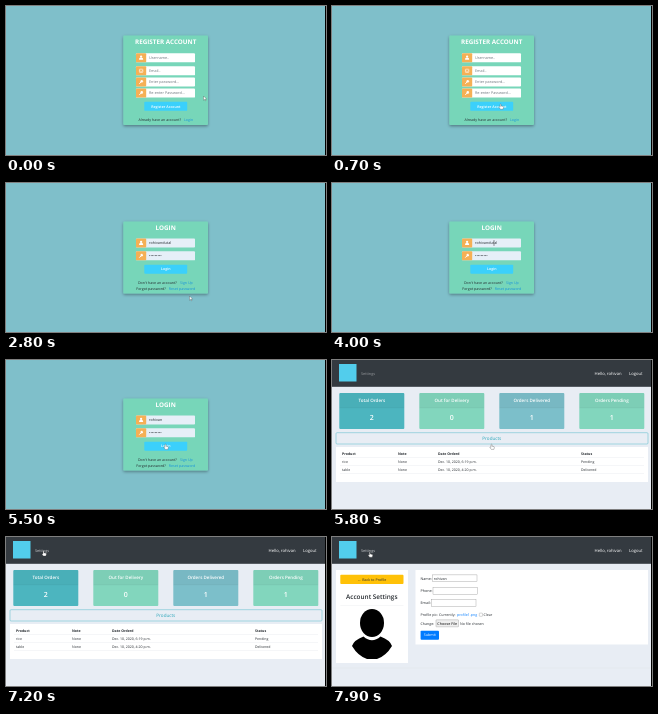
An HTML page for the animation above (8000 ms loop, 320x149 px).

```html
<!DOCTYPE html>
<html lang="en">
<head>
<meta charset="utf-8">
<title>Account and orders</title>
<style>
  html, body { margin: 0; width: 100%; height: 100%; overflow: hidden; background: #7fbfca; }
  svg { display: block; width: 100vw; height: 100vh; }
  text {
    font-family: "Open Sans", "Noto Sans", sans-serif;
    text-rendering: geometricPrecision;
    white-space: pre;
  }
</style>
</head>
<body>
<svg id="stage" viewBox="0 0 320 149" preserveAspectRatio="none">
  <defs>
    <filter id="shadow" x="-20%" y="-20%" width="140%" height="150%">
      <feDropShadow dx="0" dy="1.2" stdDeviation="1.7" flood-color="#000" flood-opacity=".38"/>
    </filter>
  </defs>
</svg>
<script>
const LOOP = 8000, STEP = 100;
const USER = 'rohivan', SUFFIX = 'dutal';
const WHITE = '#fff', INK = '#24292e', LINK = '#1590dc', TEAL = '#2ba6ba';
const stage = document.getElementById('stage');

function el(parent, tag, attrs, content) {
  const node = document.createElementNS('http://www.w3.org/2000/svg', tag);
  for (const key in attrs) node.setAttribute(key, attrs[key]);
  if (content !== undefined) node.textContent = content;
  parent.appendChild(node);
  return node;
}
const group = (parent = stage) => el(parent, 'g', {});
const rect = (g, x, y, width, height, fill, more) =>
  el(g, 'rect', { x, y, width, height, fill, ...more });
const path = (g, d, fill, more) => el(g, 'path', { d, fill, ...more });

// y is the middle of the line of text
function label(g, content, x, y, size, fill, more) {
  return el(g, 'text', { x, y: y + size * 0.34, 'font-size': size, fill, ...more }, content);
}
const centred = (g, content, x, y, size, fill, weight = 400) =>
  label(g, content, x, y, size, fill, { 'text-anchor': 'middle', 'font-weight': weight });

const icons = {
  user(g, x, y) {
    el(g, 'circle', { cx: x, cy: y - 1.1, r: 1.15, fill: WHITE });
    path(g, `M${x - 2} ${y + 2}v-.7q0-1.3 1.4-1.3h1.2q1.4 0 1.4 1.3v.7z`, WHITE);
  },
  mail(g, x, y) {
    rect(g, x - 1.7, y - 1.6, 3.4, 3.2, 'none', { stroke: WHITE, 'stroke-width': 0.6, rx: 0.4 });
    path(g, `M${x - 1.6} ${y - 0.3}l1.6 1.1l1.6 -1.1`, 'none', { stroke: WHITE, 'stroke-width': 0.5 });
  },
  key(g, x, y) {
    el(g, 'circle', { cx: x + 0.7, cy: y - 0.7, r: 1.3, fill: WHITE });
    path(g, `M${x + 0.2} ${y - 0.2}l-2 2`, 'none', { stroke: WHITE, 'stroke-width': 1 });
    el(g, 'circle', { cx: x + 1.1, cy: y - 1.1, r: 0.35, fill: '#f5b055' });
  }
};

function field(g, y, icon, content, fill, ink) {
  rect(g, 130, y - 4.5, 59, 9, fill, { rx: 0.9 });
  rect(g, 130, y - 4.5, 10.2, 9, '#f5b055', { rx: 0.9 });
  icons[icon](g, 135.1, y);
  return label(g, content, 143, y, 3.75, ink);
}

function formCard(top, height, title) {
  const g = group();
  rect(g, 0, 0, 320, 149, '#7fbfca');
  rect(g, 117.3, top, 84.7, height, '#77d6b9', { rx: 1.2, filter: 'url(#shadow)' });
  centred(g, title, 159.7, top + 6.4, 6.3, WHITE, 700);
  return g;
}
function formButton(g, y, content) {
  rect(g, 138.3, y - 4.5, 42.9, 9, '#3bd0fb', { rx: 0.9 });
  centred(g, content, 159.8, y, 3.6, WHITE, 600);
}

// Register
const register = formCard(29.6, 89.4, 'REGISTER ACCOUNT');
[[51.8, 'user', 'Username..'], [64.8, 'mail', 'Email..'],
 [76, 'key', 'Enter password...'], [87.1, 'key', 'Re-enter Password...']]
  .forEach(([y, icon, hint]) => field(register, y, icon, hint, WHITE, '#6c757d'));
formButton(register, 100.3, 'Register Account');
label(register, 'Already have an account?', 132.5, 113.7, 3.6, INK);
const loginLink = label(register, 'Login', 178, 113.7, 3.6, LINK);

// Login
const login = formCard(38.5, 72, 'LOGIN');
const userText = field(login, 60, 'user', '', '#e6eff8', INK);
field(login, 72.8, 'key', '•••••••••', '#e6eff8', INK);
formButton(login, 86.2, 'Login');
label(login, "Don't have an account?", 132, 99.7, 3.6, INK);
label(login, 'Sign Up', 174, 99.7, 3.6, LINK);
label(login, 'Forgot password?', 130.3, 105.3, 3.6, INK);
label(login, 'Reset password', 162.8, 105.3, 3.6, LINK);

// Shared page frame
const site = group();
rect(site, 0, 0, 320, 149, '#e8edf4');
rect(site, 0, 0, 320, 26.8, '#343a40');
rect(site, 7, 4, 17.5, 17.5, '#52cdec');
const settingsLink = label(site, 'Settings', 29, 13.7, 3.8, '#999c9f');
const navText = { 'font-weight': 500 };
label(site, 'Hello, ' + USER, 262.6, 13.7, 4.2, WHITE, navText);
label(site, 'Logout', 297, 13.7, 4.2, WHITE, navText);

// Dashboard
const dash = group();
[['Total Orders', 2, '#4cb5bf'], ['Out for Delivery', 0, '#82d6bd'],
 ['Orders Delivered', 1, '#7cbfca'], ['Orders Pending', 1, '#82d6bd']]
  .forEach(([name, count, fill], i) => {
    const x = 7.3 + i * 80;
    rect(dash, x, 33, 65, 36, fill, { rx: 1 });
    rect(dash, x, 33, 65, 15, '#000', { rx: 1, opacity: 0.035 });
    rect(dash, x, 47.8, 65, 0.3, '#000', { opacity: 0.12 });
    centred(dash, name, x + 32.5, 40, 4.5, WHITE, 600);
    centred(dash, count, x + 32.5, 57.3, 7, WHITE, 600);
  });
const bar = rect(dash, 4, 72.7, 312, 11.3, 'transparent',
  { rx: 1, stroke: '#55b9c8', 'stroke-width': 0.5 });
const barText = centred(dash, 'Products', 159.8, 78.5, 4.6, TEAL);
rect(dash, 4, 87, 312, 35, WHITE);
const columns = [10, 66, 106, 249];
[['Product', 'Note', 'Date Orderd', 'Status'],
 ['rice', 'None', 'Dec. 10, 2020, 6:19 p.m.', 'Pending'],
 ['table', 'None', 'Dec. 10, 2020, 4:20 p.m.', 'Delivered']]
  .forEach((row, r) => {
    const y = 93.5 + r * 8;
    row.forEach((cell, c) =>
      label(dash, cell, columns[c], y, 3.5, INK, { 'font-weight': r ? 400 : 700 }));
    rect(dash, 8, y + 4, 304, 0.3, '#dee2e6');
  });

// Settings
const settings = group();
const side = rect(settings, 4, 33, 72, 93, WHITE);
rect(settings, 8.3, 37.8, 63.2, 9.2, '#ffc107', { rx: 0.9 });
centred(settings, '← Back to Profile', 40, 42.4, 3.6, INK);
centred(settings, 'Account Settings', 39.8, 59.7, 6.4, INK, 600);
rect(settings, 8.3, 68, 63.2, 0.3, '#e2e4e6');
const portrait = group(settings);
el(portrait, 'ellipse', { cx: 40, cy: 86, rx: 12, ry: 14, fill: '#000' });
path(portrait, 'M20 109Q22 103 31.5 99.5Q40 107 48.5 99.5Q58 103 60 109Q54 119 45 122H35Q26 119 20 109Z', '#000');
rect(settings, 0, 130.8, 320, 0.4, '#dadfe6');

rect(settings, 83.5, 33, 232.5, 74.5, WHITE);
const box = { stroke: '#8a8a8a', 'stroke-width': 0.35 };
[['Name:', 41.3, 100.5, USER], ['Phone:', 53.8, 101, ''], ['Email:', 66.1, 99.5, '']]
  .forEach(([name, y, x, value]) => {
    label(settings, name, 88.5, y, 3.7, INK);
    rect(settings, x, y - 3.4, 44.5, 6.8, WHITE, box);
    label(settings, value, x + 1.3, y, 3.7, INK);
  });
label(settings, 'Profile pic: Currently:', 88.5, 77.8, 3.6, INK);
label(settings, 'profile1.png', 125, 77.8, 3.6, '#007bff');
rect(settings, 147.3, 76.1, 3.2, 3.2, WHITE, { rx: 0.5, ...box });
label(settings, 'Clear', 151.5, 77.8, 3.6, INK);
label(settings, 'Change:', 88.5, 86.3, 3.6, INK);
rect(settings, 104, 82.8, 22.5, 7, '#efefef', { rx: 0.5, ...box });
centred(settings, 'Choose File', 115.2, 86.3, 3.7, '#000');
label(settings, 'No file chosen', 128, 86.3, 3.6, INK);
rect(settings, 88.6, 93.7, 18.4, 9, '#007bff', { rx: 0.9 });
centred(settings, 'Submit', 97.8, 98.2, 3.7, WHITE);

// Dark strip along the right edge
rect(stage, 319, 0, 1, 149, '#000');

// Pointers, each with its hot spot at 0,0
const outline = { stroke: '#333', 'stroke-width': 0.3, 'stroke-linejoin': 'round' };
const pointer = group();
const shapes = {
  arrow: path(pointer, 'M0 0V4.2L1 3.3L1.7 4.8L2.4 4.5L1.8 3.1H3.1Z', WHITE, outline),
  hand: path(pointer,
    'M-.5 .4Q0-.4 .5 .4V2L2.6 2.5Q3 2.7 2.9 3.4L2.4 5.2H-.2L-1.6 3.3Q-1.5 2.5-.5 3.1Z', WHITE, outline),
  beam: path(pointer, 'M-.8-2.2H.8M0-2.2V2.2M-.8 2.2H.8', 'none', { stroke: '#333', 'stroke-width': 0.4 })
};

// start, end, then the point reached at the end
const moves = [
  [0, 0, 197.5, 90],
  [200, 900, 161.5, 100],
  [1000, 1400, 183.5, 113],
  [3100, 3700, 162, 60],
  [4700, 5000, 159.5, 84.2],
  [6100, 7000, 37.3, 13.4],
  [7000, 7200, 37.5, 13.8],
  [7400, 7500, 37.8, 15]
];
const smooth = p => p * p * (3 - 2 * p);

function pointerAt(t) {
  let [, , x, y] = moves[0];
  for (const [start, end, toX, toY] of moves.slice(1)) {
    if (t <= start) break;
    const p = smooth(Math.min(1, (t - start) / (end - start)));
    x += (toX - x) * p;
    y += (toY - y) * p;
  }
  return [x, y];
}

const show = (node, on) => node.setAttribute('display', on ? 'inline' : 'none');

function draw(t) {
  t = Math.floor(t / STEP) * STEP;
  const [x, y] = pointerAt(t);
  const inside = (x0, y0, x1, y1) => x >= x0 && x <= x1 && y >= y0 && y <= y1;
  const onRegister = t < 2800, onLogin = !onRegister && t < 5800;
  const onDash = t >= 5800 && t < 7500, onSettings = t >= 7500;

  show(register, onRegister);
  show(login, onLogin);
  show(site, onDash || onSettings);
  show(dash, onDash);
  show(settings, onSettings);

  const overLink = onRegister && t >= 1700;
  loginLink.setAttribute('text-decoration', overLink ? 'underline' : 'none');
  loginLink.setAttribute('fill', overLink ? '#0b68b8' : LINK);

  const erased = Math.max(0, Math.min(SUFFIX.length, (t - 4000) / STEP));
  userText.textContent = USER + SUFFIX.slice(0, SUFFIX.length - erased);

  const overBar = onDash && t >= 6200 && inside(4, 72.7, 316, 84);
  bar.setAttribute('fill', overBar ? '#17a2b8' : 'transparent');
  barText.setAttribute('fill', overBar ? WHITE : TEAL);

  const overSettings = inside(28, 10, 43, 18);
  settingsLink.setAttribute('fill', overSettings ? '#cfd1d3' : '#999c9f');

  const loaded = t >= 7700;
  show(portrait, loaded);
  side.setAttribute('height', loaded ? 93 : 42);

  let kind = 'arrow';
  if (onLogin && (inside(140, 55, 189, 65) || inside(140, 68, 189, 78))) kind = 'beam';
  else if (overLink || overBar || overSettings ||
           (onRegister && inside(138, 96, 181, 105)) ||
           (onLogin && inside(138, 82, 181, 91)) ||
           (onDash && t < 6200)) kind = 'hand';
  for (const name in shapes) show(shapes[name], name === kind);
  pointer.setAttribute('transform', `translate(${x} ${y})`);
}

const begin = performance.now();
function tick() {
  draw((performance.now() - begin) % LOOP);
  requestAnimationFrame(tick);
}
tick();
</script>
</body>
</html>
```
